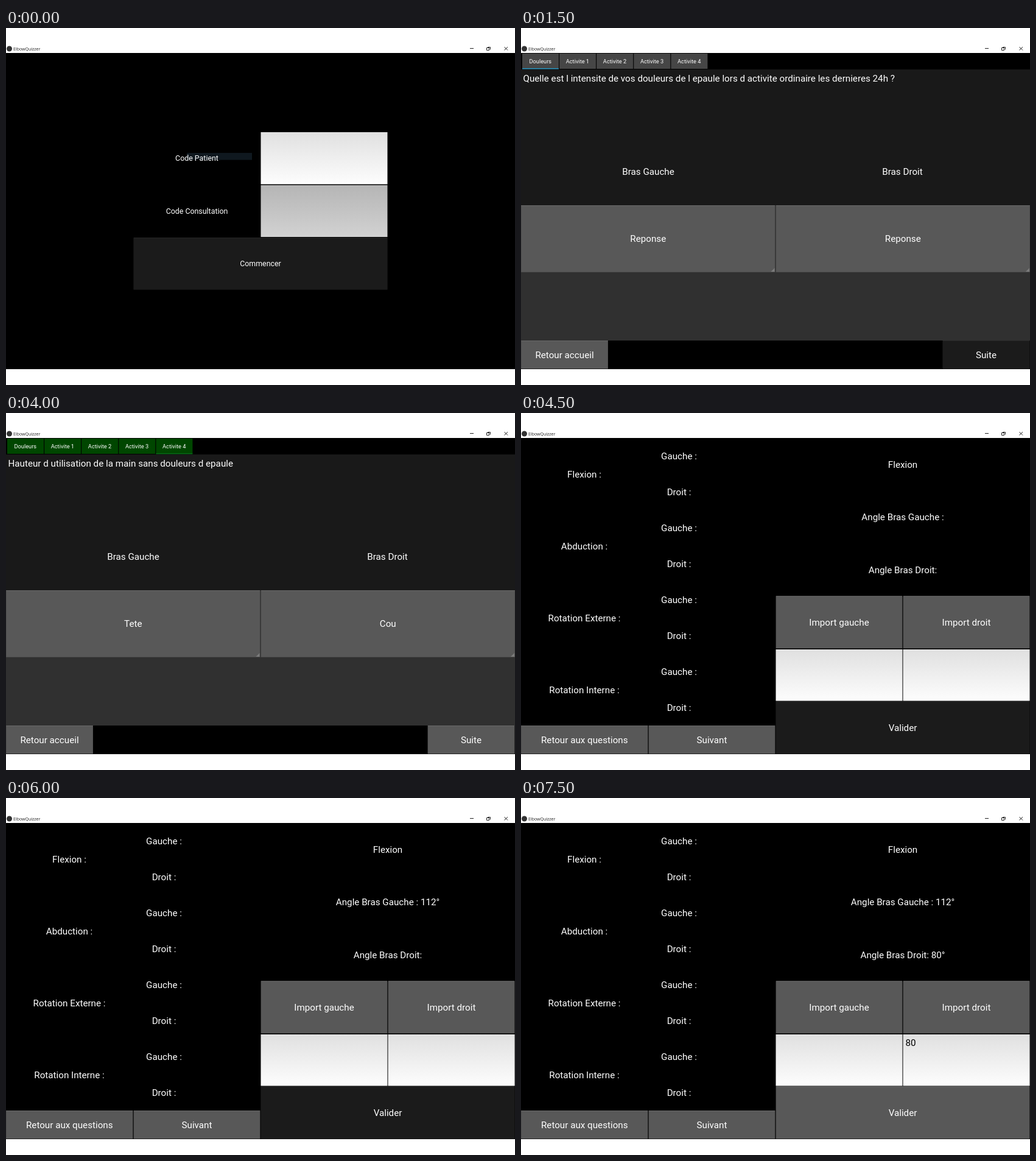
An HTML page with a canvas for the animation above (8000 ms loop, 836 by 586 pixels).

```html
<!DOCTYPE html>
<html lang="fr">
<head>
<meta charset="utf-8">
<title>ElbowQuizzer</title>
<style>
  html, body { margin: 0; width: 836px; height: 586px; overflow: hidden; background: #fff; }
  canvas { display: block; }
</style>
</head>
<body>
<canvas id="stage" width="836" height="586"></canvas>
<script>
const ctx = document.getElementById('stage').getContext('2d');
const STEP = 500, LOOP = 8000;
const BIG = 15.2, MID = 12.4, SMALL = 9.25;
const GREY = '#585858', DARK = '#1b1b1b', LINE = '#2d9cc8';

function rect(x, y, w, h, color) {
  ctx.fillStyle = color;
  ctx.fillRect(x, y, w, h);
}

// cy is the middle of the capital letters
function text(str, x, cy, size = BIG, align = 'center', color = '#fff', font = 'Roboto', weight = 400) {
  ctx.font = `${weight} ${size}px ${font}, sans-serif`;
  ctx.textAlign = align;
  ctx.fillStyle = color;
  ctx.fillText(str, x, cy + size * 0.355);
}

function button(label, x, y, w, h, { size = BIG, enabled = true } = {}) {
  rect(x, y, w, h, enabled ? '#444' : '#202020');
  rect(x + 0.5, y, w - 1, h - 0.5, enabled ? GREY : DARK);
  rect(x + 0.5, y, w - 1, 1, enabled ? '#686868' : '#252525');
  text(label, x + w / 2, y + h / 2, size);
}

function field(value, x, y, w, h, size, enabled = true) {
  const fill = ctx.createLinearGradient(0, y, 0, y + h);
  fill.addColorStop(0, enabled ? '#e0e0e0' : '#b5b5b5');
  fill.addColorStop(1, enabled ? '#fdfdfd' : '#d2d2d2');
  rect(x, y, w, h, fill);
  text(value, x + 4, y + 13.5, size, 'left', '#000');
}

function titleBar() {
  rect(0, 0, 836, 586, '#fff');
  rect(0, 41, 836, 519, '#000');
  ctx.fillStyle = '#333';
  ctx.beginPath();
  ctx.arc(5.5, 34, 4.5, 0, 7);
  ctx.fill();
  text('ElbowQuizzer', 12, 34.5, 7, 'left', '#222', 'Open Sans');
  ctx.strokeStyle = '#222';
  ctx.lineWidth = 1;
  ctx.stroke(new Path2D('M762 33.5h6M789.5 32.5h4v4h-4zM791 31.5h4.5v4M818.5 31l5.5 5.5M824 31l-5.5 5.5'));
}

function login({ patient = '', visit = '', ghost }) {
  if (ghost) rect(297, 205, 107, 11.5, '#0f181f');
  text('Code Patient', 313.5, 214, MID);
  text('Code Consultation', 313.5, 301, MID);
  field(patient, 418.5, 171, 208, 85.5, MID);
  field(visit, 418.5, 258, 208, 85, MID, !!patient);
  button('Commencer', 209.5, 344, 417, 85.5, { size: MID, enabled: !!visit });
}

const PAIN = 'Quelle est l intensite de vos douleurs de l epaule lors d activite ordinaire les dernieres 24h ?';
const HEIGHT = 'Hauteur d utilisation de la main sans douleurs d epaule';
const CHOICES = ['Aucune', 'Legere', 'Moderee', 'Severe'];
const TABS = ['Douleurs', 'Activite 1', 'Activite 2', 'Activite 3', 'Activite 4'];

function spinner(label, x, w) {
  button(label, x, 291, w, 110);
  ctx.fillStyle = '#7c7c7c';
  ctx.fill(new Path2D(`M${x + w - 1} 394v6h-6z`));
}

function quiz({ ask = PAIN, tab = 0, done = 0, left = 'Reponse', right = 'Reponse', open }) {
  TABS.forEach((name, i) => {
    const x = 2 + i * 61.1, green = i < done;
    rect(x, 42, 60, 25, green ? '#004600' : '#464646');
    if (i === tab) rect(x, 66, 60, 1.5, green ? '#087018' : LINE);
    text(name, x + 29.8, 55, SMALL);
  });
  rect(0, 68.5, 836, 444.5, '#303030');
  rect(0, 69, 836, 222, '#191919');
  text(ask, 3.5, 83, BIG, 'left');
  text('Bras Gauche', 209, 236);
  text('Bras Droit', 626.5, 236);
  spinner(left, 0, 417.5);
  spinner(right, 418.5, 417.5);
  button('Retour accueil', 0, 513, 143, 46.5);
  button('Suite', 692.5, 513, 143, 46.5, { enabled: done === TABS.length });
  if (open) {
    const x = open === 'left' ? 0 : 418.5;
    CHOICES.forEach((name, i) => button(name, x, 401 + i * 29.5, 417.5, 29.5, { size: SMALL }));
  }
}

const FILES = ['..\\'];
const addFiles = prefix => { for (let n = 1; n < 6; n++) FILES.push(`${prefix}_${n}.csv`); };
['A_H_120', 'A_H_40', 'A_H_90'].forEach(addFiles);
FILES.push('Angles summary.xlsx');
['F_G_120', 'F_G_90'].forEach(addFiles);
const SIZES = [0, 110, 99, 117, 108, 108, 83, 83, 76, 79, 88, 113, 103, 128, 125, 114, 12,
  333, 313, 315, 292, 278, 322, 169, 189, 204, 335];

function chooser(selected) {
  rect(0, 41, 836, 519, 'rgba(0,0,0,.75)');
  ctx.fillStyle = '#242424';
  ctx.beginPath();
  ctx.roundRect(45, 69.5, 744.5, 459, 2);
  ctx.fill();
  text('Charger Fichier', 53.5, 85, 8.65, 'left');
  rect(49, 95, 738, 1.8, LINE);
  text('Name', 55, 110, SMALL, 'left', '#fff', 'Roboto', 700);
  text('Size', 781, 110, SMALL, 'right', '#fff', 'Roboto', 700);
  ctx.save();
  ctx.beginPath();
  ctx.rect(49, 115, 738, 393);
  ctx.clip();
  FILES.forEach((name, i) => {
    const y = 122.7 + i * 14.66;
    rect(49, y - 7.33, 737, 14.66, i === selected ? '#4d4d4d' : i % 2 ? '#313131' : '#242424');
    text(name, 63.5, y, SMALL, 'left', '#e6e6e6');
    if (i) text(`${SIZES[i]} KB`, 781, y, SMALL, 'right', '#e6e6e6');
  });
  rect(785, 115, 2, 190, '#484848');
  ctx.restore();
  button('Annuler', 49.5, 508, 367.5, 18, { size: SMALL });
  button('Charger', 418, 508, 368, 18, { size: SMALL });
}

function measure({ left = '', right = '', typed = '', ready = false, popup, selected }) {
  ['Flexion :', 'Abduction :', 'Rotation Externe :', 'Rotation Interne :'].forEach((name, i) => {
    const y = i * 118;
    text(name, 104, 101 + y);
    text('Gauche :', 259.5, 71 + y);
    text('Droit :', 259.5, 130 + y);
  });
  text('Flexion', 627, 85);
  text('Angle Bras Gauche :' + left, 627, 171);
  text('Angle Bras Droit:' + right, 627, 258);
  button('Import gauche', 418.5, 300.5, 208, 86);
  button('Import droit', 627.5, 300.5, 208, 86);
  field('', 418.5, 388, 208, 84.5, BIG);
  field(typed, 627.5, 388, 208, 84.5, BIG);
  button('Valider', 418.5, 473.5, 417, 86, { enabled: ready });
  button('Retour aux questions', 0, 513, 208.5, 46.5);
  button('Suivant', 209.5, 513, 208, 46.5);
  if (popup) chooser(selected);
}

// One entry per half second
const SCENES = [
  [login, { ghost: true }],
  [login, { patient: '12' }],
  [login, { patient: '12', visit: '1' }],
  [quiz, {}],
  [quiz, { open: 'left' }],
  [quiz, { left: 'Legere' }],
  [quiz, { left: 'Legere', open: 'right' }],
  [quiz, { left: 'Legere', right: 'Moderee', done: 1 }],
  [quiz, { ask: HEIGHT, tab: 4, done: 5, left: 'Tete', right: 'Cou' }],
  [measure, {}],
  [measure, { popup: true }],
  [measure, { popup: true, selected: 5 }],
  [measure, { left: ' 112°' }],
  [measure, { left: ' 112°', popup: true }],
  [measure, { left: ' 112°', right: ' 117°', ready: true }],
  [measure, { left: ' 112°', right: ' 80°', typed: '80', ready: true }],
];

function draw() {
  const [scene, state] = SCENES[Math.floor(performance.now() % LOOP / STEP)];
  titleBar();
  scene(state);
  requestAnimationFrame(draw);
}
draw();
</script>
</body>
</html>
```
